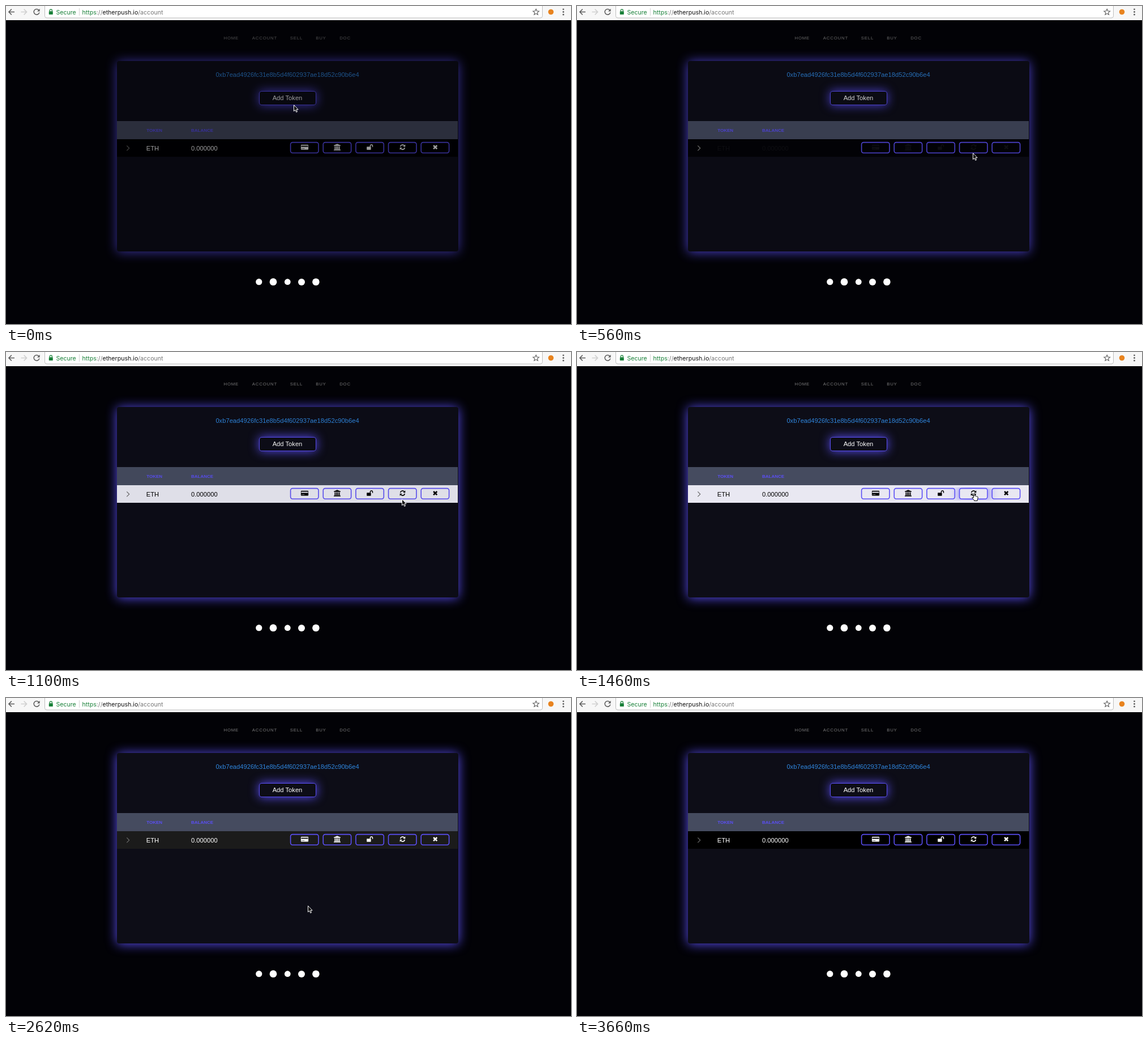
These frames come from a looping animation (998 px wide and 561 px high, 3.97 s). An HTML page:

```html
<!DOCTYPE html>
<html lang="en">
<head>
<meta charset="utf-8">
<title>Account</title>
<style>
  html, body { margin: 0; width: 100%; height: 100%; overflow: hidden; background: #020206; }
  div, svg { position: absolute; box-sizing: border-box; }
  svg { left: 0; top: 0; width: 998px; height: 561px; }
  text { font-family: "Liberation Sans", Arial, sans-serif; font-size: 11.2px; }
  #page { left: 0; top: 0; width: 998px; height: 561px; --row: #000; --ink: #fff; --chevron: #707070; }
  #panel { left: 196px; top: 97px; width: 602.5px; height: 336px; border-radius: 4px;
    background: #0d0d17; box-shadow: 0 1px 20px #5b4ff5; }
  #add { left: 447px; top: 149.5px; width: 101px; height: 25px; border-radius: 4px;
    border: 1.6px solid #5b4ff5; box-shadow: 0 0 18px #5b4ff5; }
  #head { left: 196px; top: 203px; width: 602px; height: 32px; background: #454b5f; }
  #row { left: 196px; top: 235px; width: 602px; height: 31px; background: var(--row); }
  #clip { left: 196px; top: 239px; width: 602px; height: 22px; overflow: hidden; }
  #glow { left: 479.6px; top: 1px; width: 50.6px; height: 20px; border-radius: 4px;
    box-shadow: 0 0 20px #5b4ff5; }
  .nav text { font-size: 7.8px; letter-spacing: .8px; fill: #7a7a7a; }
  .th text { font-size: 8px; font-weight: bold; fill: #5b4ff5; }
  .bar text { font-family: Inter, Roboto, sans-serif; font-size: 10.6px; }
  .ink { fill: var(--ink); }
  .line { fill: none; stroke: var(--ink); }
  .frames rect { fill: none; stroke: #5b4ff5; stroke-width: 1.6; }
</style>
</head>
<body>
<div id="page">
  <div id="panel"></div>
  <div id="add"></div>
  <div id="head"></div>
  <div id="row"></div>
  <div id="clip"><div id="glow"></div></div>
  <svg viewBox="0 0 998 561">
    <g class="nav">
      <text x="384.5" y="58.8">HOME</text>
      <text x="434.8" y="58.8">ACCOUNT</text>
      <text x="501.8" y="58.8">SELL</text>
      <text x="547.2" y="58.8">BUY</text>
      <text x="589.2" y="58.8">DOC</text>
    </g>
    <text x="497" y="125.3" text-anchor="middle" fill="#2f86de">0xb7ead4926fc31e8b5d4f602937ae18d52c90b6e4</text>
    <text x="497" y="165.6" text-anchor="middle" fill="#fff">Add Token</text>
    <g class="th">
      <text x="248.2" y="221.8">TOKEN</text>
      <text x="327" y="221.8">BALANCE</text>
    </g>
    <path d="M213.3 246.4L217.7 250.8L213.3 255.2" fill="none" stroke="var(--chevron)" stroke-width="1.1"/>
    <text class="ink" x="247.8" y="254.7">ETH</text>
    <text class="ink" x="327" y="254.7">0.000000</text>
    <g class="frames" id="frames"></g>

    <!-- card, bank, open lock, refresh, cross -->
    <g transform="translate(527.5 249)">
      <path class="ink" fill-rule="evenodd" d="M-5.6 -4.3H5.6Q6.6 -4.3 6.6 -3.3V3.4Q6.6 4.4 5.6 4.4H-5.6Q-6.6 4.4 -6.6 3.4V-3.3Q-6.6 -4.3 -5.6 -4.3ZM-6 -2.4V-.5H6V-2.4ZM-5.4 2.2V3.1H-3.7V2.2ZM-2.8 2.2V3.1H-.4V2.2Z"/>
    </g>
    <g transform="translate(585 249)">
      <path class="ink" d="M0 -5.7L6 -3.2V-2.2H-6V-3.2ZM-4.5 -1.6H-2.9V3H-4.5ZM-2 -1.6H-.4V3H-2ZM.5 -1.6H2.1V3H.5ZM3 -1.6H4.6V3H3ZM-5.2 3.2H5.2V4.2H-5.2ZM-6 4.6H6V5.7H-6Z"/>
    </g>
    <g transform="translate(642.7 249)">
      <rect class="ink" x="-5.5" y="-.8" width="7.4" height="5.5" rx=".6"/>
      <path class="line" stroke-width="1.4" d="M.7 -.6V-2.2A2.05 2.05 0 0 1 4.8 -2.2V-.2"/>
    </g>
    <g transform="translate(700.5 249)">
      <path class="line" stroke-width="1.6" d="M-3.9 -1A4 4 0 0 1 2.9 -2.8M3.9 1A4 4 0 0 1 -2.9 2.8"/>
      <path class="ink" d="M4.8 -4.8V-.8H.8ZM-4.8 4.8V.8H-.8Z"/>
    </g>
    <path class="line" stroke-width="2.6" d="M755.1 246L761.3 252.2M761.3 246L755.1 252.2"/>
  </svg>
</div>

<svg viewBox="0 0 998 561">
  <g class="bar">
    <rect width="998" height="25" fill="#f7f7f7"/>
    <path d="M68.5 0V17.5Q68.5 21 72 21H944Q947.5 21 947.5 17.5V0" fill="#fff" stroke="#bdbdbd"/>
    <g fill="none" stroke="#5c5c5c" stroke-width="1.5">
      <path d="M15 10.5H5M9.8 5.6L4.9 10.5L9.8 15.4"/>
      <path d="M26.5 10.5H36.5M31.7 5.6L36.6 10.5L31.7 15.4" stroke="#cfcfcf"/>
      <path d="M58.2 7.6A4.9 4.9 0 1 0 58.9 11.3"/>
    </g>
    <path d="M59.6 4.8V9.4H55Z" fill="#5c5c5c"/>
    <rect x="75.8" y="9.3" width="7" height="5.8" rx=".7" fill="#188038"/>
    <path d="M77.2 9.5V8A2.1 2.1 0 0 1 81.4 8V9.5" fill="none" stroke="#188038" stroke-width="1.2"/>
    <text x="88.5" y="14.6" fill="#188038">Secure</text>
    <path d="M129.5 4V17" stroke="#d4d4d4"/>
    <text x="134.5" y="14.6" fill="#777"><tspan fill="#188038">https</tspan>://<tspan fill="#111">etherpush.io</tspan>/account</text>
    <path d="M936.2 5.3L937.7 8.8L941.5 9.1L938.6 11.6L939.5 15.3L936.2 13.3L932.9 15.3L933.8 11.6L930.9 9.1L934.7 8.8Z" fill="none" stroke="#5c5c5c" stroke-width="1.1"/>
    <circle cx="962.5" cy="10.5" r="4.8" fill="#e8831f"/>
    <g fill="#5c5c5c">
      <circle cx="984.5" cy="5.8" r="1.4"/>
      <circle cx="984.5" cy="10.5" r="1.4"/>
      <circle cx="984.5" cy="15.2" r="1.4"/>
    </g>
  </g>
  <g fill="#fff">
    <circle cx="446.8" cy="486.7" r="5.6"/>
    <circle cx="472" cy="486.7" r="6.4"/>
    <circle cx="497.3" cy="486.7" r="5.4"/>
    <circle cx="522" cy="487" r="6"/>
    <circle cx="547.4" cy="486.7" r="6.3"/>
  </g>
  <path id="arrow" d="M.5 .7V11.6L3 9.3L4.8 13.3L6.5 12.5L4.8 8.7H8.1Z" fill="#000" stroke="#fff" stroke-width="1"/>
  <path id="hand" d="M3.6 8V1.8Q3.6 .6 4.6 .6Q5.7 .6 5.7 1.8V5Q6.6 4.3 7.4 5.4Q8.4 4.8 9.2 6Q10.7 5.6 11.2 7.2Q11.3 9.4 10.2 11.5V13.4H4.6V12.3Q2.4 10.5 .8 8Q1 6.4 3.6 8Z" fill="#fff" stroke="#000" stroke-width="1"/>
</svg>

<script>
  const LOOP = 3970;
  const $ = id => document.getElementById(id);
  const page = $('page'), glow = $('glow'), arrow = $('arrow'), hand = $('hand');

  for (let i = 0; i < 5; i++) {
    const r = document.createElementNS('http://www.w3.org/2000/svg', 'rect');
    const box = { x: 502.6 + 57.65 * i, y: 240.6, width: 49.4, height: 18.6, rx: 3.6 };
    for (const k in box) r.setAttribute(k, box[k]);
    $('frames').append(r);
  }

  // background, text, chevron
  const looks = {
    dark:  ['#000', '#fff', '#707070'],
    ink:   ['#030306', '#111116', '#909090'],
    mid:   ['#c6c5cf', '#000', '#666'],
    light: ['#e9e8f2', '#000', '#606060'],
    dim:   ['#1b1b1b', '#fff', '#707070']
  };

  // start, pointer x, pointer y, brightness, row look, hovering
  const steps = [
    [0,    508, 174, .61, 'dark'],
    [150,  560, 196, .71, 'dark'],
    [380,  640, 226, .77, 'dark'],
    [560,  699, 259, .83, 'ink'],
    [740,  699, 259, .9,  'mid'],
    [1100, 699, 259, .96, 'light'],
    [1280, 561, 227, .97, 'light'],
    [1460, 697, 249, 1,   'light', true],
    [2440, 668, 339, 1,   'light', true],
    [2620, 533, 366, 1,   'dim'],
    [2770, 558, 314, 1,   'dark'],
    [2910, 897, 475, 1,   'dark'],
    [3060, 914, 493, 1,   'dark'],
    [3210, 923, 498, 1,   'dark'],
    [3360, 952, 534, 1,   'dark'],
    [3510, 960, 551, 1,   'dark'],
    [3660, 998, 600, 1,   'dark']
  ];
  const HAND_AT = 1460;
  let shown = null;

  function show([start, x, y, bright, look, hover]) {
    const [row, ink, chevron] = looks[look];
    page.style.opacity = bright;
    page.style.setProperty('--row', row);
    page.style.setProperty('--ink', ink);
    page.style.setProperty('--chevron', chevron);
    glow.style.visibility = hover ? 'visible' : 'hidden';
    const isHand = start === HAND_AT;
    arrow.style.display = isHand ? 'none' : '';
    hand.style.display = isHand ? '' : 'none';
    (isHand ? hand : arrow).setAttribute('transform', `translate(${x} ${y})`);
  }

  const origin = performance.now();
  function tick() {
    const t = (performance.now() - origin) % LOOP;
    const step = steps.filter(s => s[0] <= t).pop();
    if (step !== shown) show(shown = step);
    requestAnimationFrame(tick);
  }
  tick();
</script>
</body>
</html>
```
